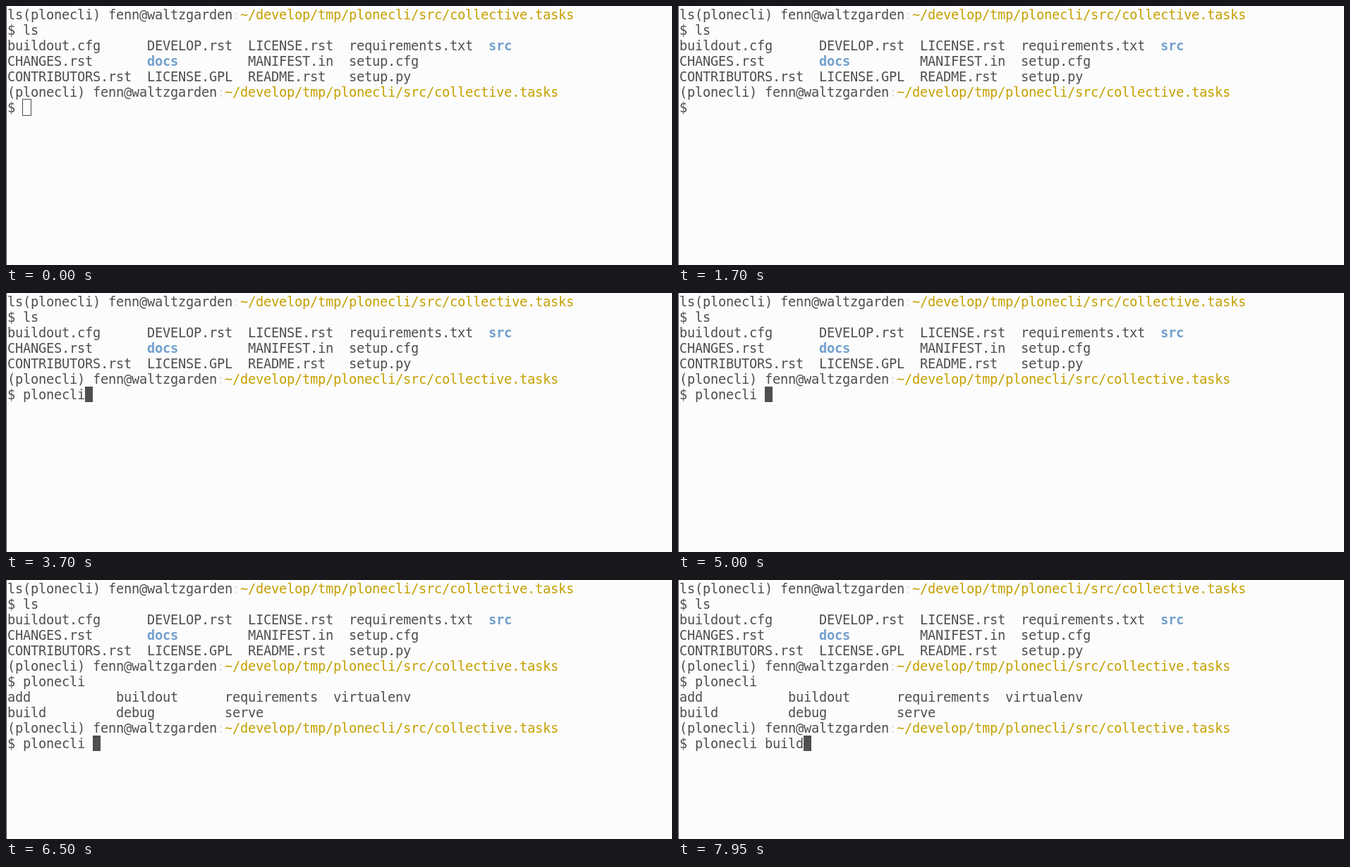
Recreate the animation shown at these times as an HTML page with a canvas. Size 944 by 368 pixels, loop 8000 ms.

```html
<!DOCTYPE html>
<html lang="en">
<head>
<meta charset="utf-8">
<title>Terminal session</title>
<style>
  html, body { margin: 0; width: 100%; height: 100%; overflow: hidden; background: #fcfcfc; }
  canvas { display: block; }
</style>
</head>
<body>
<canvas id="screen" width="944" height="368"></canvas>
<script>
const ctx = document.getElementById("screen").getContext("2d");
const LOOP = 8000, BLINK = 600, FOCUS_AT = 1000, LIST_AT = 5250;
const CELL_W = 11, CELL_H = 22, LEFT = 2, TOP = 1, ASCENT = 18;
const COLORS = {
  paper: "#fcfcfc", text: "#4f4f4f", path: "#c4a000", colon: "#e4e6e0",
  folder: "#729fcf", cursor: "#4f4f4f", edge: "#4f4f4f"
};
const COMMAND = "$ plonecli ";

// Key presses: each types one character.
const firstKeys = [2350, 2500, 2650, 2800, 2950, 3100, 3250, 3400, 3800];
const secondKeys = [7050, 7200, 7350, 7500, 7650];
const blinkStarts = [FOCUS_AT, ...firstKeys, LIST_AT, ...secondKeys];

const countPassed = (times, t) => times.filter(time => time <= t).length;
const cellX = col => LEFT + col * CELL_W;
const cellY = row => TOP + row * CELL_H;

function write(row, col, text, color = COLORS.text, weight = "normal") {
  ctx.font = `${weight} 18.67px "DejaVu Sans Mono", monospace`;
  ctx.fillStyle = color;
  [...text].forEach((char, i) => ctx.fillText(char, cellX(col + i), cellY(row) + ASCENT));
}

function writeColumns(row, stops, words) {
  words.forEach((word, i) => {
    const isFolder = word === "docs" || word === "src";
    write(row, stops[i], word, isFolder ? COLORS.folder : COLORS.text, isFolder ? "bold" : "normal");
  });
}

function writePrompt(row, prefix = "") {
  const host = prefix + "(plonecli) fenn@waltzgarden";
  write(row, 0, host);
  write(row, host.length, ":", COLORS.colon);
  write(row, host.length + 1, "~/develop/tmp/plonecli/src/collective.tasks", COLORS.path);
}

function drawCursor(row, col, t) {
  const x = cellX(col), y = cellY(row);
  if (t < FOCUS_AT) {
    ctx.strokeStyle = COLORS.cursor;
    ctx.strokeRect(x - 0.5, y - 0.5, CELL_W + 1, CELL_H + 1);
    return;
  }
  const lastStart = blinkStarts[countPassed(blinkStarts, t) - 1];
  if (Math.floor((t - lastStart) / BLINK) % 2 === 0) {
    ctx.fillStyle = COLORS.cursor;
    ctx.fillRect(x, y, CELL_W, CELL_H);
  }
}

function draw(t) {
  ctx.fillStyle = COLORS.paper;
  ctx.fillRect(0, 0, 944, 368);
  ctx.fillStyle = COLORS.edge;
  ctx.fillRect(0, 0, 1, 368);

  writePrompt(0, "ls");
  write(1, 0, "$ ls");
  const fileStops = [0, 18, 31, 44, 62];
  writeColumns(2, fileStops, ["buildout.cfg", "DEVELOP.rst", "LICENSE.rst", "requirements.txt", "src"]);
  writeColumns(3, fileStops, ["CHANGES.rst", "docs", "MANIFEST.in", "setup.cfg"]);
  writeColumns(4, fileStops, ["CONTRIBUTORS.rst", "LICENSE.GPL", "README.rst", "setup.py"]);
  writePrompt(5);

  let row = 6;
  let line = COMMAND.slice(0, 2 + countPassed(firstKeys, t));
  write(row, 0, line);
  if (t >= LIST_AT) {
    const commandStops = [0, 14, 28, 42];
    writeColumns(7, commandStops, ["add", "buildout", "requirements", "virtualenv"]);
    writeColumns(8, commandStops, ["build", "debug", "serve"]);
    writePrompt(9);
    row = 10;
    line = COMMAND + "build".slice(0, countPassed(secondKeys, t));
    write(row, 0, line);
  }
  drawCursor(row, line.length, t);
}

function tick() {
  draw(performance.now() % LOOP);
  requestAnimationFrame(tick);
}
tick();
</script>
</body>
</html>
```
